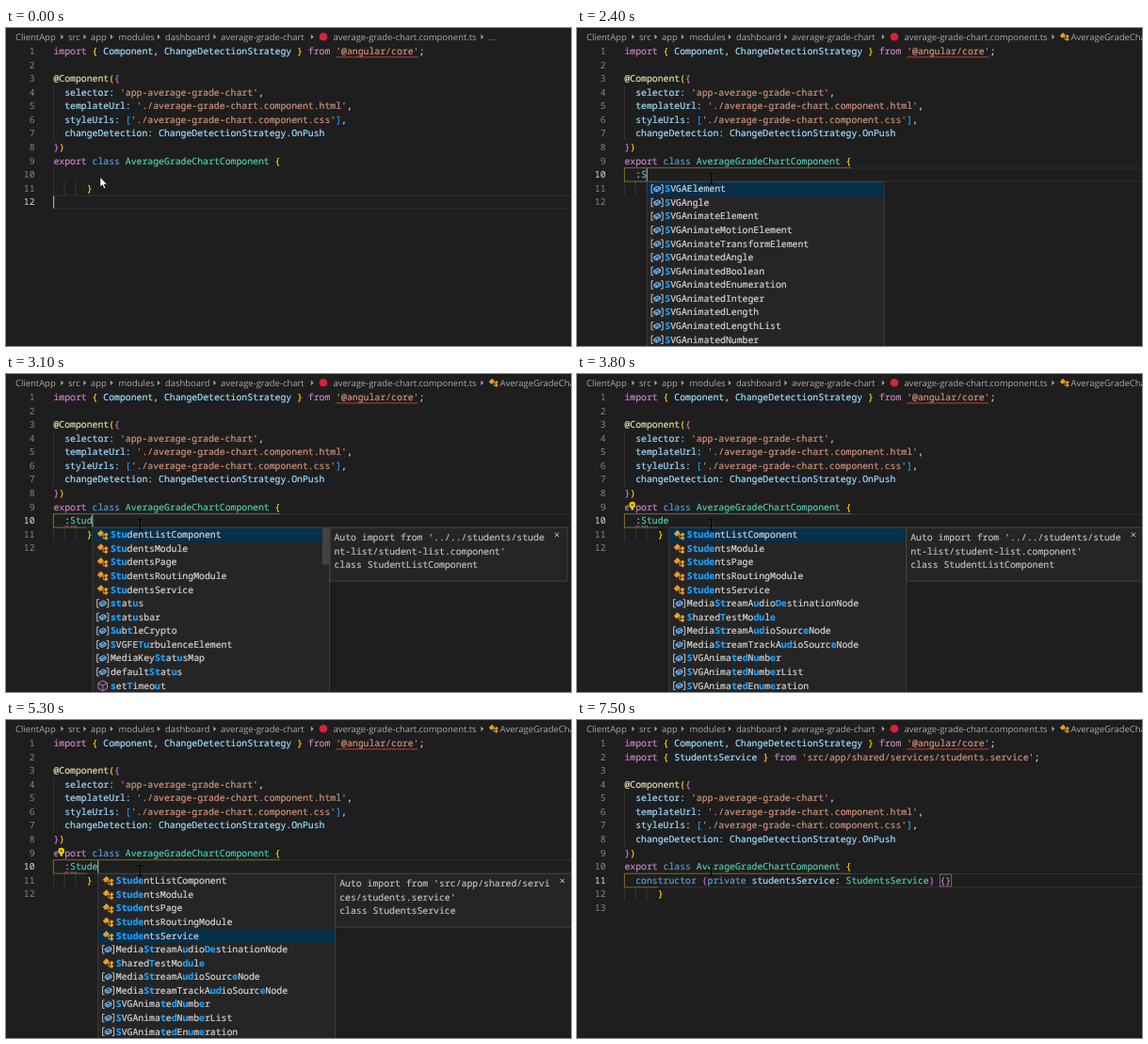
Recreate the animation shown at these times as an HTML page. Size 600 by 338 pixels, loop 8 s.

```html
<!DOCTYPE html>
<html lang="en">
<head>
<meta charset="utf-8">
<title>Editor autocomplete</title>
<style>
  html, body { margin: 0; width: 100%; height: 100%; overflow: hidden; background: #1e1e1e; }
  svg { display: block; width: 100vw; height: 100vh; }
  text { white-space: pre; text-rendering: geometricPrecision; }
  .code { font: 500 9.8px "Noto Sans Mono", "DejaVu Sans Mono", monospace; stroke-width: .2px; }
  .ui { font: 9.45px "Open Sans", "Noto Sans", sans-serif; fill: #a9a9a9; }
</style>
</head>
<body>
<svg id="stage" viewBox="0 0 600 338"></svg>
<script>
const LOOP = 8000, CHAR = 5.88, LINE = 14.57, LEFT = 50.4;
const colors = {
  k: '#c586c0', g: '#ffd700', m: '#da70d6', b: '#179fff', v: '#9cdcfe', d: '#d4d4d4',
  s: '#ce9178', f: '#dcdcaa', c: '#569cd6', t: '#4ec9b0'
};

// "~" starts a token, the next letter is its colour.
const head = "~kimport ~g{ ~vComponent~d, ~vChangeDetectionStrategy ~g} ~kfrom ~s'@angular/core'~d;";
const service = "~kimport ~g{ ~vStudentsService ~g} ~kfrom ~s'src/app/shared/services/students.service'~d;";
const body = [
  "",
  "~f@Component~g(~m{",
  "~v  selector: ~s'app-average-grade-chart'~d,",
  "~v  templateUrl: ~s'./average-grade-chart.component.html'~d,",
  "~v  styleUrls: ~b[~s'./average-grade-chart.component.css'~b]~d,",
  "~v  changeDetection: ~vChangeDetectionStrategy~d.~vOnPush",
  "~m}~g)",
  "~kexport ~cclass ~tAverageGradeChartComponent ~g{"
];
const ctor = "~c  constructor ~m(~cprivate ~vstudentsService~d: ~tStudentsService~m) {}";

// "|" toggles the matched letters; the first letter picks the icon.
const listS = ['AElement', 'Angle', 'AnimateElement', 'AnimateMotionElement', 'AnimateTransformElement',
  'AnimatedAngle', 'AnimatedBoolean', 'AnimatedEnumeration', 'AnimatedInteger', 'AnimatedLength',
  'AnimatedLengthList', 'AnimatedNumber'].map(n => 'v|S|VG' + n);
const students = m => ['ListComponent', 'sModule', 'sPage', 'sRoutingModule', 'sService']
  .map(n => `c|${m}|${'Student'.slice(m.length)}${n}`);
const listStu = [...students('Stu'), 'v|st|at|u|s', 'v|st|at|u|sbar', 'v|Su|b|t|leCrypto',
  'v|S|VGFE|Tu|rbulenceElement', 'vMediaKey|St|at|u|sMap', 'vdefault|St|at|u|s', 'm|s|et|T|imeo|u|t'];
const listStude = [...students('Stude').map(s => s.replace('||e', '|')), 'vMedia|St|reamA|u|dio|De|stinationNode',
  'c|S|hared|T|estMo|du|l|e|', 'vMedia|St|reamA|ud|ioSourc|e|Node', 'vMedia|St|reamTrackA|ud|ioSourc|e|Node',
  'v|S|VGAnima|t|e|d|N|u|mb|e|r', 'v|S|VGAnima|t|e|d|N|u|mb|e|rList', 'v|S|VGAnima|t|e|d|En|u|m|e|ration'];

const details = [
  ['../../students/student-list/student-list.component', 'StudentListComponent'],
  ['../../students/students.module', 'StudentsModule'],
  ['e2e/src/students/students.po', 'StudentsPage'],
  ['../../students/students-routing.module', 'StudentsRoutingModule'],
  ['src/app/shared/services/students.service', 'StudentsService']
];

const typed = [[0, ''], [2100, ':'], [2400, ':S'], [2500, ':St'], [2700, ':Stu'], [2900, ':Stud'],
  [3300, ':Stude'], [5600, ':StudentsService']];
const caretOn = [[0, 1], [1200, 0], [1700, 1], [3800, 0], [4300, 1], [4700, 0], [5300, 1],
  [6100, 0], [6600, 1], [7500, 0]];
const selection = [[0, 0], [3900, 1], [4200, 2], [4900, 3], [5100, 4]];

const at = (keys, t) => keys.reduce((v, [time, value]) => t >= time ? value : v, keys[0][1]);
const within = (t, a, b) => t >= a && t < b;
const colX = c => LEFT + c * CHAR;
const top_ = n => 17.5 + (n - 1) * LINE;
const rect = (x, y, w, h, fill, more = '') => `<rect x="${x}" y="${y}" width="${w}" height="${h}" fill="${fill}" ${more}/>`;
const path = (d, stroke, w = 1, fill = 'none') => `<path d="${d}" stroke="${stroke}" stroke-width="${w}" fill="${fill}"/>`;
const span = (s, color, more = '') => `<tspan fill="${color}" stroke="${color}" ${more}>${s}</tspan>`;
const text = (x, y, s, cls = 'code', more = '') => `<text class="${cls}" x="${x}" y="${y}" ${more}>${s}</text>`;

const codeLine = (n, src, more) => text(LEFT, top_(n) + 10.5,
  src.split('~').slice(1).map(s => span(s.slice(1), colors[s[0]])).join(''), 'code', more);

function squiggle(x, y, len) {
  let d = `M${x} ${y}`;
  for (let i = 1; i * 1.5 <= len; i++) d += `l1.5 ${i % 2 ? -1.6 : 1.6}`;
  return path(d, '#f14c4c', 0.8);
}

const icons = {
  c: path('M-5.5 -1.2L-2 -4.7L.8 -2L-2.7 1.5Z', '#ee9d28', 0.8, '#ee9d28') +
     path('M-1 0H2M.3 0V3.6H2', '#ee9d28', 0.9) +
     path('M1.6 -.2L3.6 -2.2L5.4 -.4L3.4 1.6ZM1.6 3.4L3.6 1.6L5.4 3.4L3.4 5.2Z', '#ee9d28', 0.8, '#ee9d28'),
  v: path('M-4 -4.2H-6V4.2H-4M4 -4.2H6V4.2H4', '#c5c5c5', 1) +
     path('M-3.4 -.7L.8 -2.9L3.4 -1.4V1L-.8 3L-3.4 1.6ZM-3.4 -.7L-.8 .6L3.4 -1.4M-.8 .6V3', '#75beff', 1, '#285b83'),
  m: path('M0 -5.4L4.8 -2.8V2.8L0 5.4L-4.8 2.8V-2.8ZM-4.8 -2.8L0 -.2L4.8 -2.8M0 -.2V5.4', '#b180d7', 1)
};
const icon = (kind, x, y, size = 1) => `<g transform="translate(${x} ${y}) scale(${size})">${icons[kind]}</g>`;

function breadcrumb(inClass) {
  const parts = [[10, 'ClientApp'], [66, 'src'], [90, 'app'], [119.5, 'modules'], [169, 'dashboard'],
    [228, 'average-grade-chart'], [347.5, 'average-grade-chart.component.ts']];
  let s = parts.map(([x, name]) => text(x, 12.7, name, 'ui')).join('');
  for (const x of [58.5, 82.5, 111, 161, 220.5, 324, 504.5])
    s += path(`M${x} 7l2.6 2.4l-2.6 2.4Z`, '#a0a0a0', 0.3, '#a0a0a0');
  s += '<circle cx="337" cy="9.3" r="4.3" fill="#dd2038"/>';
  return s + (inClass ? icon('c', 517.8, 9.2, 0.85) + text(524.6, 12.7, 'AverageGradeChartComponent', 'ui')
                      : text(512, 12.7, '...', 'ui'));
}

function popup(t, x, list, sel) {
  const y = 163.6;
  let s = rect(x, y, 251.6, 180, '#252526', 'stroke="#454545" stroke-width=".8"');
  s += rect(x + 0.5, y + 0.4 + sel * LINE, 250.6, LINE, '#062f4a');
  list.forEach((item, i) => {
    const mid = y + 7.4 + i * LINE;
    const name = item.slice(1).split('|').map((p, j) =>
      j % 2 ? span(p, '#18a3ff', 'font-weight="700"') : span(p, '#d4d4d4')).join('');
    s += icon(item[0], x + 10.8, mid) + text(x + 19, mid + 3.3, name);
  });
  if (within(t, 2700, 3300)) s += rect(x + 244, y + 0.4, 7.4, 38.4, '#434344');
  return s;
}

function panel(x, [file, name]) {
  const note = `Auto import from '${file}'`;
  const lines = [note.slice(0, 38), note.slice(38), 'class ' + name];
  return rect(x, 163.6, 252, 56.6, '#252526', 'stroke="#454545" stroke-width=".8"') +
    lines.map((l, i) => text(x + 4.2, 177 + i * LINE, span(l, '#bdbdbd'))).join('') +
    path(`M${x + 238.6} 168.7l4.4 4.4m0 -4.4l-4.4 4.4`, '#c5c5c5', 1);
}

function pointer(t) {
  const p = Math.min(1, Math.max(0, (t - 500) / 500));
  const e = p * p * (3 - 2 * p);
  const x = 100 + 42.5 * e, y = 158.5 + 1.5 * e;
  if (t < 600) return path(`M${x} ${y}v10.5l2.4 -2.2l1.7 3.9l1.7 -.8l-1.7 -3.7h3.3Z`, '#000', 0.6, '#fff');
  const beam = `M${x - 2.6} ${y - 5.5}q2.6 0 2.6 1.2v9q0 1.2 -2.6 1.2m5.2 0q-2.6 0 -2.6 -1.2v-9q0 -1.2 2.6 -1.2`;
  return path(beam, '#454545', 1.8) + path(beam, '#000', 1.3);
}

function render(t) {
  const clicked = t >= 900, added = t >= 5600, done = t >= 7000;
  const shift = added ? 1 : 0, edit = 10 + shift, active = clicked ? edit : 12;
  const word = at(typed, t), count = 12 + shift, y = top_(edit), below = y + LINE;
  let s = rect(0, 0, 600, 338, '#1e1e1e') + breadcrumb(t >= 1000);

  // current line, indent guides
  s += rect(LEFT, top_(active) + 0.3, 560, LINE - 0.6, 'none', 'stroke="#333" stroke-width=".9"');
  s += path(`M${LEFT} ${top_(4 + shift)}v${4 * LINE}M${LEFT} ${y}v${2 * LINE}` +
    `M${colX(2)} ${below}v${LINE}M${colX(4)} ${below}v${LINE}`, '#404040', 0.7);
  if (clicked) s += path(`M291 ${y}H${LEFT}V${below}H${colX(6)}`, 'rgba(255,215,0,.5)', 0.7);

  for (let n = 1; n <= count; n++)
    s += text(30.6, top_(n) + 10.5, n, 'code', `text-anchor="end" fill="${n === active ? '#dadada' : '#858585'}"`);

  s += codeLine(1, head) + squiggle(colX(51), 31.7, 15 * CHAR);
  if (added) s += codeLine(2, service, t < 7500 ? 'opacity=".67"' : '');
  body.forEach((src, i) => { s += codeLine(i + 2 + shift, src); });
  s += codeLine(edit + 1, '~g      }');

  if (done) {
    s += codeLine(edit, ctor);
    if (t >= 7300) s += rect(colX(57), y + 0.8, 2 * CHAR, LINE - 1.6, 'none', 'stroke="#888" stroke-width=".7"');
  } else if (word) {
    s += codeLine(edit, `~d  :~t${word.slice(1)}`);
    if (t >= 2700) s += squiggle(colX(2), below - 0.6, CHAR);
    if (t >= 2900) for (let i = 0; i < 3; i++) s += rect(colX(3) + 1 + i * 2.4, below - 1.8, 1.1, 1.1, '#a5a5a5');
  }

  if (within(t, 3800, 5600) || within(t, 6300, 7000)) {
    const by = y - 9;
    s += rect(55, by - 4.5, 7.4, 10.5, '#1e1e1e') +
      `<circle cx="58.7" cy="${by - 0.5}" r="3.3" fill="#ffcc00"/><circle cx="58.7" cy="${by - 0.5}" r="1.4" fill="#8b7315"/>` +
      rect(57.4, by + 2.4, 2.6, 2.5, '#ffcc00');
  }

  if (at(caretOn, t)) {
    const col = done ? 58 : clicked ? 2 + word.length : 0;
    s += rect(colX(col) - 0.2, top_(active) + 0.7, 1, LINE - 1.4, '#c0c0bd');
  }

  if (within(t, 2400, 5600)) {
    const sel = at(selection, t);
    const list = t < 2700 ? listS : t < 3300 ? listStu : listStude;
    if (t >= 3000) s += panel(t < 3200 ? 344.2 : 350, details[sel]);
    s += popup(t, colX(2 + word.length) + 0.4, list, sel);
  }
  return s + pointer(t);
}

const stage = document.getElementById('stage');
let last = -1;
function frame() {
  const t = Math.floor(performance.now() % LOOP / 100) * 100;
  if (t !== last) stage.innerHTML = render(last = t);
  requestAnimationFrame(frame);
}
frame();
</script>
</body>
</html>
```
